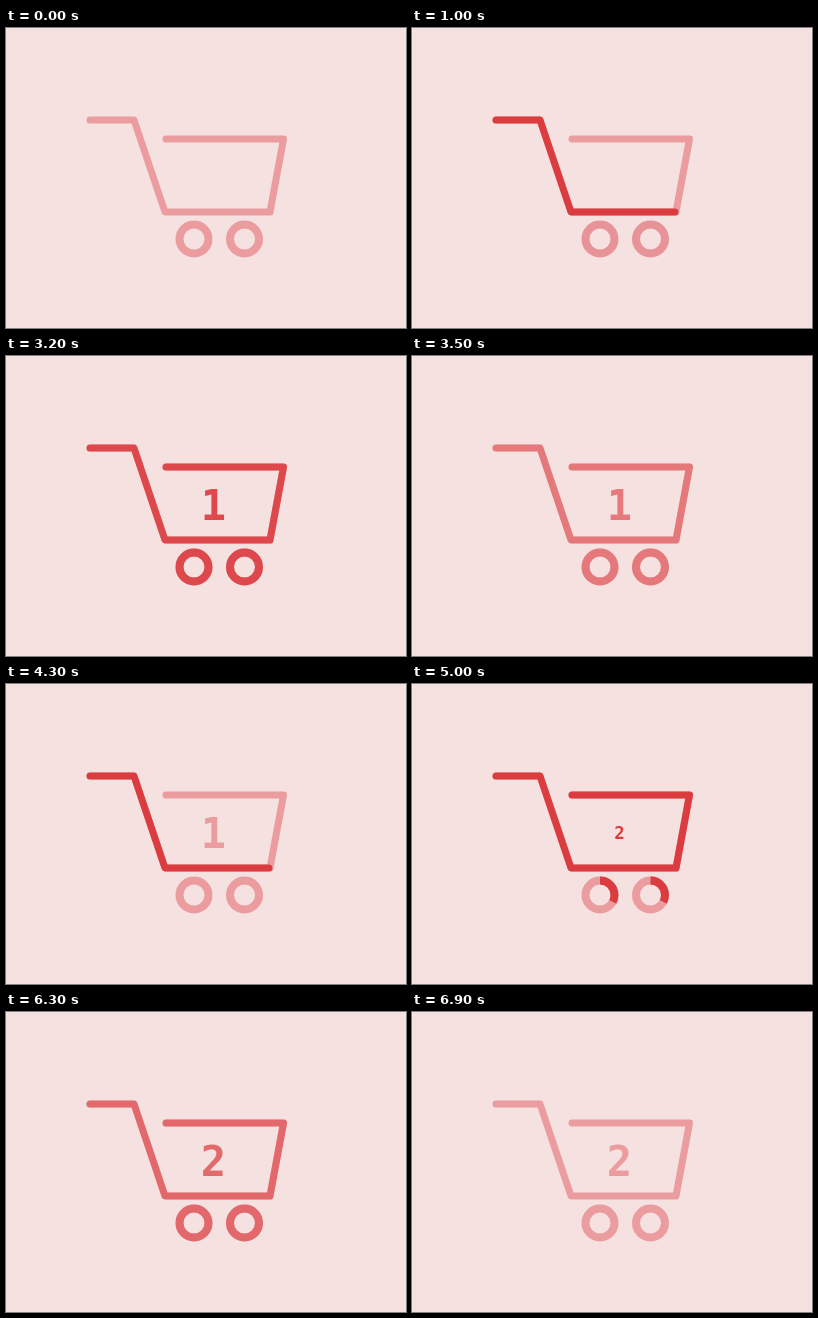
An HTML page for the animation above (7100 ms loop, 400 by 300 pixels).

```html
<!DOCTYPE html>
<html lang="en">
<head>
<meta charset="utf-8">
<title>Cart counter</title>
<style>
html, body { margin: 0; width: 100%; height: 100%; overflow: hidden; background: #f4e1e0; }
svg { display: block; width: 100vw; height: 100vh; }
.line { fill: none; stroke-width: 7; stroke-linecap: round; stroke-linejoin: round; }
.ring { fill: none; stroke-width: 8; }
.pale { stroke: #eb9c9e; }
.bold { stroke: #db3c40; }
text { font: bold 42px "DejaVu Sans Mono", monospace; text-anchor: middle; }
</style>
</head>
<body>
<svg viewBox="0 0 400 300">
  <defs>
    <path id="cart" pathLength="1" d="M84 92H128L159 184H264L277.5 111H160"/>
    <path id="wheel" pathLength="1" d="M0-14.5A14.5 14.5 0 0 1 0 14.5A14.5 14.5 0 0 1 0-14.5"/>
  </defs>
  <use href="#cart" class="line pale"/>
  <g id="rims" class="ring pale">
    <use href="#wheel" x="188" y="211"/>
    <use href="#wheel" x="238.5" y="211"/>
  </g>
  <g id="ink">
    <use id="body" href="#cart" class="line bold"/>
    <g id="wheels" class="ring bold">
      <use href="#wheel" x="188" y="211"/>
      <use href="#wheel" x="238.5" y="211"/>
    </g>
  </g>
  <g id="count"><text id="digit" y="15.5"></text></g>
</svg>
<script>
const LOOP = 7100, STEP = 100;
const PALE = [235, 156, 158], BOLD = [219, 60, 64];
const el = id => document.getElementById(id);
const clamp = v => Math.min(1, Math.max(0, v));
const span = (t, start, length) => clamp((t - start) / length);
const blend = k => `rgb(${BOLD.map((c, i) => Math.round(c + (PALE[i] - c) * k))})`;

// cubic-bezier(.25, .1, .25, 1), solved by bisection
function ease(x) {
  let lo = 0, hi = 1;
  for (let i = 0; i < 24; i++) {
    const s = (lo + hi) / 2;
    if (.75 * s * (1 - s) + s ** 3 < x) lo = s; else hi = s;
  }
  return x <= 0 ? 0 : x >= 1 ? 1 : .3 * lo * (1 - lo) ** 2 + 3 * (1 - lo) * lo * lo + lo ** 3;
}

// grow with a small overshoot
function pop(x) {
  const u = x - 1;
  return 1 + 3.2 * u ** 3 + 2.2 * u * u;
}

function trace(node, k) {
  node.style.visibility = k > 0 ? "visible" : "hidden";
  node.style.strokeDasharray = k < 1 ? `${k} 2` : "none";
}

function render(t) {
  const second = t >= 3900;
  const start = second ? 4000 : 700;
  const fade = span(t, second ? 6020 : 3120, 600);
  trace(el("body"), ease(span(t, start, 925)));
  trace(el("wheels"), ease(span(t, start + 850, 700)));
  el("ink").style.opacity = 1 - fade;
  el("rims").style.stroke = t >= 800 && t < 2400 ? "#e79398" : "";

  const two = t >= 5000;
  const grow = two ? span(t, 4950, 550) : span(t, 2340, 560);
  const size = grow > 0 ? Math.max(0, pop(grow)) : 0;
  el("digit").textContent = two ? "2" : "1";
  el("digit").style.fill = blend(second && !two ? 1 : fade);
  el("count").setAttribute("transform", `translate(207.5 148.5) scale(${size})`);
}

const begin = performance.now();
function tick() {
  const t = (performance.now() - begin) % LOOP;
  render(Math.floor(t / STEP) * STEP);
  requestAnimationFrame(tick);
}
render(0);
requestAnimationFrame(tick);
</script>
</body>
</html>
```
